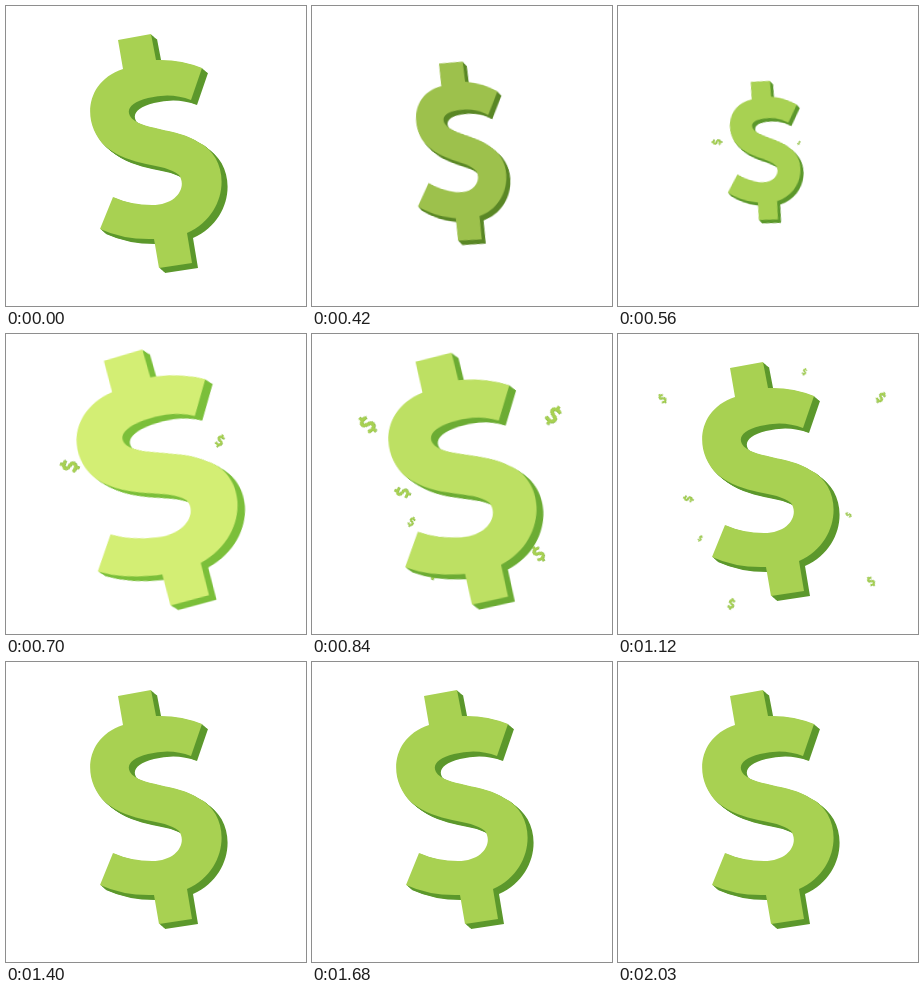
Animation of 300x300 px, one loop 2170 ms. Source, as an HTML page without scripts:

```html
<!DOCTYPE html>
<html lang="en">
<head>
<meta charset="utf-8">
<title>Dollar burst</title>
<style>
  html, body { margin: 0; width: 100%; height: 100%; overflow: hidden; background: #fff; }
  svg { display: block; width: 100vw; height: 100vh; }

  .sign { color: #a8d152; fill: #5c982c; }
  .face { fill: currentColor; }
  .big { animation: pulse 2170ms step-end infinite; }
  .coin { animation: late 2170ms step-end infinite; }
  .early { animation-name: early; }

  /* one step is 70 ms = 3.2258% of the loop */
  @keyframes pulse {
    0%, 41.935%, 100% { transform: matrix(1, 0, 0, 1, 0, 0); color: #a8d152; fill: #5c982c; }
    19.355% { transform: matrix(.71, .076, -.044, .763, 49, 23.2); color: #9dc14c; fill: #5a8726; }
    22.581% { transform: matrix(.63, .076, -.06, .66, 61.8, 37.5); color: #a2c94f; fill: #5b9029; }
    25.806% { transform: matrix(.57, .072, -.067, .592, 71.2, 47.8); color: #a8d152; fill: #5c982c; }
    29.032% { transform: matrix(.875, -.04, .006, .846, 19.8, 28.3); color: #bfe064; fill: #6cac34; }
    32.258% { transform: matrix(1.18, -.15, .08, 1.1, -37, 6.4); color: #d3ee74; fill: #7bbf3a; }
    35.484% { transform: matrix(1.26, -.2, .12, 1.17, -54.8, 4.5); color: #d3ee74; fill: #7bbf3a; }
    38.71% { transform: matrix(1.1, -.08, .05, 1.08, -21.4, 0); color: #bde063; fill: #6cac34; }
  }

  @keyframes early {
    0%, 25.8% { transform: scale(0); }
    25.806% {
      transform: translate(var(--x1), var(--y1)) rotate(var(--r1)) scale(var(--s1));
      animation-timing-function: steps(2);
    }
    32.258% {
      transform: translate(var(--x2), var(--y2)) rotate(var(--r2)) scale(var(--s2));
      animation-timing-function: steps(3);
    }
    41.935% {
      transform: translate(var(--x), var(--y)) rotate(var(--r)) scale(var(--s));
      animation-timing-function: steps(6);
    }
    61.29%, 100% {
      transform: translate(calc(var(--x) * 1.15), calc(var(--y) * 1.15)) rotate(var(--r)) scale(0);
    }
  }

  @keyframes late {
    0%, 35.48% { transform: scale(0); }
    35.484% {
      transform: translate(calc(var(--x) * .6), calc(var(--y) * .6)) rotate(var(--r)) scale(calc(var(--s) * .6));
      animation-timing-function: steps(2);
    }
    41.935% {
      transform: translate(var(--x), var(--y)) rotate(var(--r)) scale(var(--s));
      animation-timing-function: steps(6);
    }
    61.29%, 100% {
      transform: translate(calc(var(--x) * 1.15), calc(var(--y) * 1.15)) rotate(var(--r)) scale(0);
    }
  }
</style>
</head>
<body>
<svg viewBox="0 0 300 300">
  <defs>
    <path id="outline" d="M112 34 L145 28 L150 54 Q174 53 196 62 L185 94
      Q165 86 142 92 C126 96 120 103 124 110 C132 124 172 122 192 136
      C226 152 224 208 181 227 L186 257 L153 262 L148 233 Q118 234 94 223
      L107 191 Q125 199 146 199 C172 199 181 180 173 169
      C158 156 125 162 99 140 C76 118 78 76 117 63 Z"/>
    <g id="dollar">
      <use href="#outline" x="6" y="5"/>
      <use href="#outline" x="5" y="4.2"/>
      <use href="#outline" x="4" y="3.4"/>
      <use href="#outline" x="3" y="2.5"/>
      <use href="#outline" x="2" y="1.7"/>
      <use href="#outline" x="1" y=".8"/>
      <use href="#outline" class="face"/>
    </g>
    <g id="mini" transform="translate(-152 -148)">
      <use href="#outline" x="3" y="2.5"/>
      <use href="#outline" class="face"/>
    </g>
  </defs>

  <g transform="translate(150 140)">
    <g class="sign coin early" style="--x1:-51px;--y1:-4px;--r1:-80deg;--s1:.045; --x2:-86px;--y2:-8px;--r2:-68deg;--s2:.085; --x:-98px;--y:-70px;--r:-28deg;--s:.095"><use href="#mini"/></g>
    <g class="sign coin early" style="--x1:31px;--y1:-3px;--r1:40deg;--s1:.018; --x2:64px;--y2:-33px;--r2:35deg;--s2:.058; --x:105px;--y:-71px;--r:48deg;--s:.108"><use href="#mini"/></g>
    <g class="sign coin" style="--x:34px;--y:-95px;--r:28deg;--s:.063"><use href="#mini"/></g>
    <g class="sign coin" style="--x:-74px;--y:23px;--r:-65deg;--s:.09"><use href="#mini"/></g>
    <g class="sign coin" style="--x:-63px;--y:60px;--r:38deg;--s:.057"><use href="#mini"/></g>
    <g class="sign coin" style="--x:-34px;--y:121px;--r:25deg;--s:.1"><use href="#mini"/></g>
    <g class="sign coin" style="--x:96px;--y:100px;--r:-28deg;--s:.095"><use href="#mini"/></g>
    <g class="sign coin" style="--x:75px;--y:38px;--r:-50deg;--s:.06"><use href="#mini"/></g>
  </g>

  <g class="sign big"><use href="#dollar"/></g>
</svg>
</body>
</html>
```
